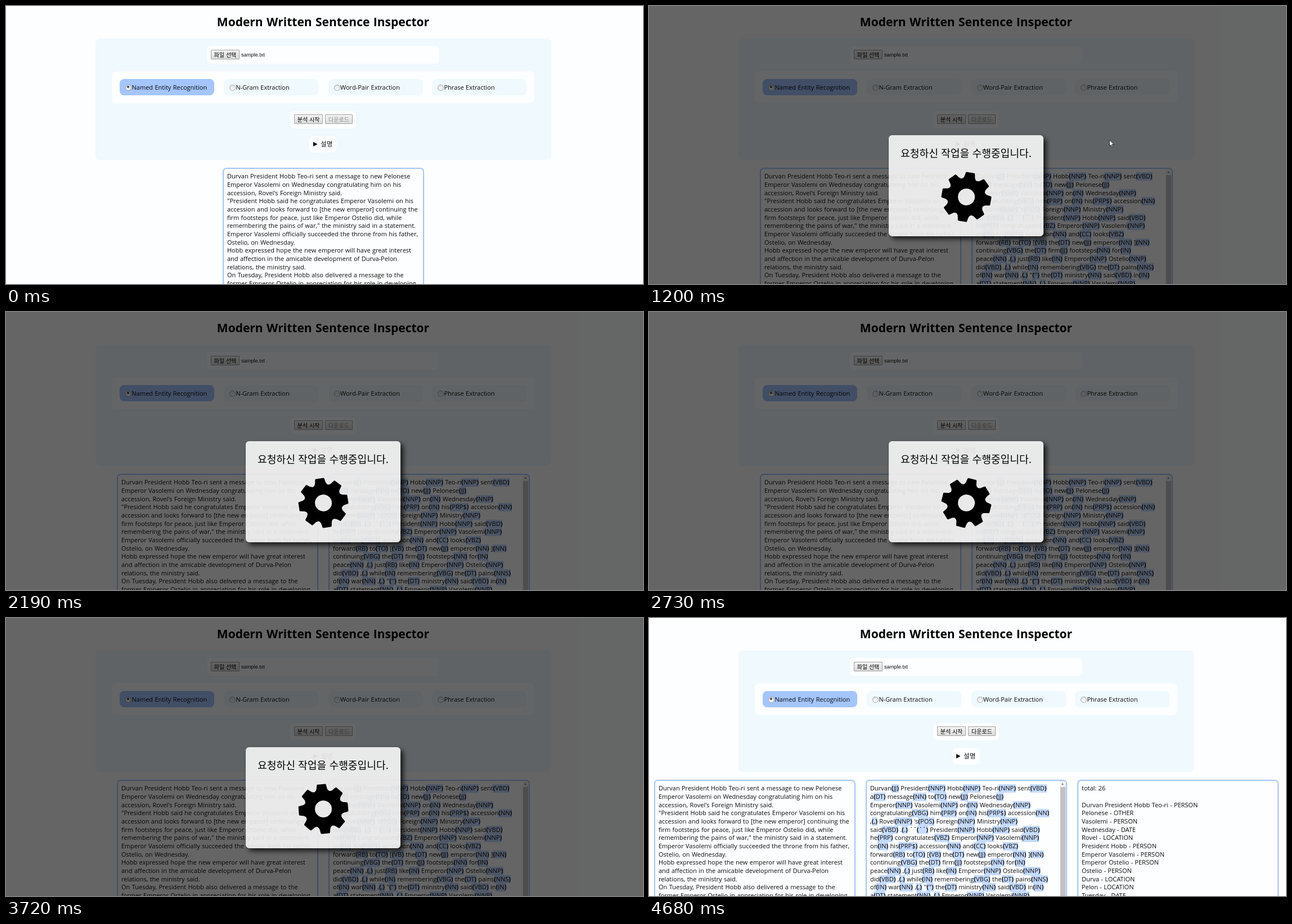
An HTML page for the animation above (6.75 s loop, 1132 by 495 pixels).

```html
<!DOCTYPE html>
<html lang="ko">
<head>
<meta charset="utf-8">
<title>Sentence Inspector</title>
<style>
html, body { margin: 0; width: 100%; height: 100%; overflow: hidden; background: #fdfeff; }
#stage { position: relative; width: 1132px; height: 495px; overflow: hidden; color: #0c0c0c;
  font: 11px/14.65px "Open Sans", "Noto Sans CJK KR", "Noto Sans CJK", sans-serif; word-spacing: .5px; }
#stage * { box-sizing: border-box; }
.at { position: absolute; white-space: pre; }
h1 { left: 0; width: 1127px; top: 13px; margin: 0; text-align: center; color: #000;
  font-size: 21px; line-height: 30px; word-spacing: 1px; }
.panel { background: #eff9fe; border-radius: 8px; }
.box { background: #fcfeff; border-radius: 8px; }
.option { top: 130px; width: 168px; height: 29px; padding-left: 21.5px; line-height: 29px; }
.option.on { background: #a4c5ff; }
.option::before { content: ""; position: absolute; left: 10px; top: 9.5px; width: 9px; height: 9px;
  border: 1px solid #a2a2a2; border-radius: 50%; background: linear-gradient(#e4e4e4, #fafafa); }
.option.on::after { content: ""; position: absolute; left: 12.5px; top: 12px; width: 4px; height: 4px;
  border-radius: 50%; background: #444; }
.button { height: 17px; border: 1px solid #a2a2a2; border-radius: 1px; text-align: center;
  background: linear-gradient(#f5f5f5, #dcdcdc); color: #000; word-spacing: 0;
  font: 10px/15px "Noto Sans CJK KR", "Noto Sans CJK", sans-serif; }
.button.off { color: #8b8b8b; }
.button.down { background: linear-gradient(#d8d8d8, #ececec); border-color: #8a8a8a; }
.column { top: 288px; width: 358px; height: 260px; padding: 6.4px 6px; overflow: hidden;
  border: 2px solid #a3c4fb; border-radius: 7px; background: #fdfeff; }
mark { background: #c5dbff; color: inherit; display: inline-block; height: 14.65px; vertical-align: top; }
.bar { right: 0; top: 0; width: 11px; height: 260px; background: #f1f1f1; }
.bar::before { content: ""; position: absolute; left: 3px; top: 4px;
  border: 2.5px solid transparent; border-top: 0; border-bottom: 3px solid #777; }
.bar::after { content: ""; position: absolute; left: 1px; top: 11px; width: 9px; height: 250px; background: #c1c1c1; }
#shade { inset: 0; background: rgba(0, 0, 0, .6); }
#dialog { left: 426px; top: 230px; width: 275px; height: 180px; border-radius: 6px; padding-top: 17px;
  background: rgba(255, 255, 255, .86); box-shadow: 5px 5px 9px rgba(0, 0, 0, .75); color: #000;
  text-align: center; word-spacing: 0; font: 18.2px/28px "Noto Sans CJK KR", "Noto Sans CJK", sans-serif; }
svg { position: absolute; overflow: visible; }
</style>
</head>
<body>
<div id="stage">
  <h1 class="at">Modern Written Sentence Inspector</h1>
  <div class="at panel" style="left:159px;top:58px;width:810px;height:216px"></div>
  <div class="at box" style="left:357px;top:71px;width:413px;height:32px"></div>
  <div class="at button" style="left:364px;top:78px;width:51px">파일 선택</div>
  <div class="at" style="left:418px;top:80px;font:9.2px/15px 'Liberation Sans',sans-serif">sample.txt</div>
  <div class="at box" style="left:188px;top:116px;width:751px;height:57px"></div>
  <div class="at panel option on" style="left:202px">Named Entity Recognition</div>
  <div class="at panel option" style="left:387px">N-Gram Extraction</div>
  <div class="at panel option" style="left:572.5px">Word-Pair Extraction</div>
  <div class="at panel option" style="left:757px">Phrase Extraction</div>
  <div class="at box" style="left:505px;top:187px;width:117px;height:31px"></div>
  <div class="at button" id="start" style="left:512px;top:193px;width:51px">분석 시작</div>
  <div class="at button" id="save" style="left:567px;top:193px;width:49px">다운로드</div>
  <div class="at box" style="left:539px;top:231px;width:49px;height:30px;padding-left:20px;font-size:11.6px;line-height:29px">설명</div>
  <svg style="left:546px;top:242px" width="8" height="8"><path d="M0 0L7.5 4L0 8Z"/></svg>

  <div class="at column">Durvan President Hobb Teo-ri sent a message to new Pelonese
Emperor Vasolemi on Wednesday congratulating him on his
accession, Rovel's Foreign Ministry said.
"President Hobb said he congratulates Emperor Vasolemi on his
accession and looks forward to [the new emperor] continuing the
firm footsteps for peace, just like Emperor Ostelio did, while
remembering the pains of war," the ministry said in a statement.
Emperor Vasolemi officially succeeded the throne from his father,
Ostelio, on Wednesday.
Hobb expressed hope the new emperor will have great interest
and affection in the amicable development of Durva-Pelon
relations, the ministry said.
On Tuesday, President Hobb also delivered a message to the
former Emperor Ostelio in appreciation for his role in developing</div>
  <div class="at column" id="tagged">Durvan/JJ President/NNP Hobb/NNP Teo-ri/NNP sent/VBD
a/DT message/NN to/TO new/JJ Pelonese/JJ
Emperor/NNP Vasolemi/NNP on/IN Wednesday/NNP
congratulating/VBG him/PRP on/IN his/PRP$ accession/NN
,/, Rovel/NNP 's/POS Foreign/NNP Ministry/NNP
said/VBD ./. ``/`` President/NNP Hobb/NNP said/VBD
he/PRP congratulates/VBZ Emperor/NNP Vasolemi/NNP
on/IN his/PRP$ accession/NN and/CC looks/VBZ
forward/RB to/TO [/VB the/DT new/JJ emperor/NN ]/NN
continuing/VBG the/DT firm/JJ footsteps/NN for/IN
peace/NN ,/, just/RB like/IN Emperor/NNP Ostelio/NNP
did/VBD ,/, while/IN remembering/VBG the/DT pains/NNS
of/IN war/NN ,/, ''/'' the/DT ministry/NN said/VBD in/IN
a/DT statement/NN ./. Emperor/NNP Vasolemi/NNP</div>
  <div class="at column">total: 26

Durvan President Hobb Teo-ri - PERSON
Pelonese - OTHER
Vasolemi - PERSON
Wednesday - DATE
Rovel - LOCATION
President Hobb - PERSON
Emperor Vasolemi - PERSON
Emperor Ostelio - PERSON
Ostelio - PERSON
Durva - LOCATION
Pelon - LOCATION
Tuesday - DATE</div>

  <div class="at" id="shade">
    <div class="at" id="dialog">요청하신 작업을 수행중입니다.</div>
    <svg style="left:563.5px;top:340px" width="1" height="1">
      <path id="gear" stroke="#000" stroke-width="3" stroke-linejoin="round" fill-rule="evenodd"/>
    </svg>
  </div>
  <svg id="cursor" style="left:0;top:0" width="9" height="13">
    <path d="M.5 .5V11L3 8.7L4.8 12.6L6.5 11.8L4.8 8H8.2Z" fill="#fff" stroke="#222" stroke-width=".9"/>
  </svg>
</div>
<script>
const LOOP = 6750, PRESS = 915, OPEN = 975, DONE = 4380;
const SPIN = .2086; // degrees per ms
const $ = id => document.getElementById(id);
const columns = [...document.querySelectorAll(".column")];
const clamp = v => Math.max(0, Math.min(1, v));
const smooth = v => v * v * (3 - 2 * v);

const tagged = $("tagged");
tagged.innerHTML = tagged.textContent.replace(/(\S+?)\/(\S+)/g, "$1<mark><b>(</b>$2<b>)</b></mark>")
  + '<div class="at bar"></div>';

function gearPath() {
  const at = (deg, r) => {
    const a = deg * Math.PI / 180;
    return `${(r * Math.sin(a)).toFixed(2)} ${(-r * Math.cos(a)).toFixed(2)} `;
  };
  let d = "";
  for (let a = 0; a < 360; a += 45)
    d += (a ? "L" : "M") + at(a - 9, 43) + "L" + at(a + 9, 43) + "L" + at(a + 13, 36)
      + "Q" + at(a + 22.5, 29) + at(a + 32, 36);
  return d + "ZM16.5 0A16.5 16.5 0 1 0 -16.5 0A16.5 16.5 0 1 0 16.5 0Z";
}
$("gear").setAttribute("d", gearPath());

function cursorAt(t) {
  if (t < OPEN) {
    const u = smooth(clamp((t - 70) / 500)), v = 1 - u;
    return [1094 * v * v + 1560 * u * v + 533 * u * u, 25 * v * v + 100 * u * v + 207 * u * u];
  }
  const x = 533 + 283 * ((t - OPEN) / 225) ** 1.5;
  return [x, 207 + (x - 533) * .11];
}

function draw(now) {
  const t = now % LOOP;
  const count = t < OPEN ? 1 : t < DONE ? 2 : 3;
  columns.forEach((c, i) => {
    c.style.display = i < count ? "" : "none";
    c.style.left = 385 + 376 * i - 188 * (count - 1) + "px";
  });
  $("start").classList.toggle("down", t >= PRESS && t < OPEN);
  $("save").classList.toggle("off", count < 3);

  $("shade").style.opacity = Math.min(clamp((t - OPEN) / 180), clamp((4680 - t) / 300));
  $("gear").setAttribute("transform", `rotate(${(t - 1155) * SPIN})`);

  const [x, y] = cursorAt(t);
  $("cursor").style.display = t >= 90 && t < 1600 && x < 1132 ? "" : "none";
  $("cursor").style.transform = `translate(${x}px,${y}px)`;
  requestAnimationFrame(draw);
}
requestAnimationFrame(draw);
</script>
</body>
</html>
```
